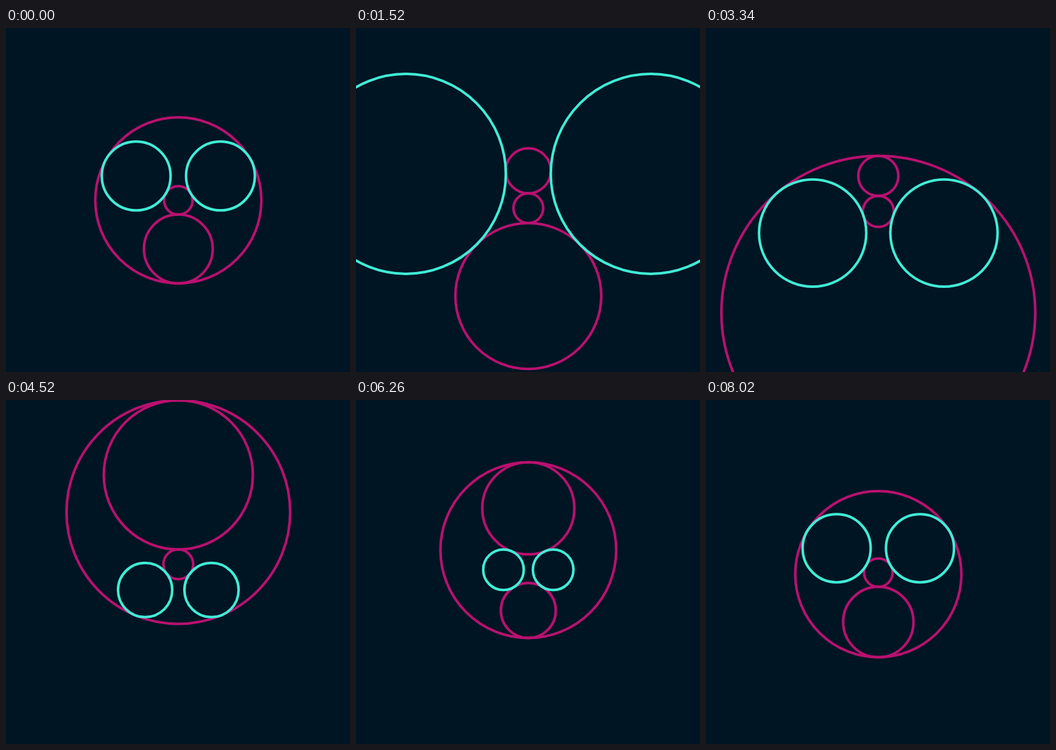
These frames come from a looping animation (540x540 px, 8.04 s). An HTML page with a canvas:

```html
<!DOCTYPE html>
<html lang="en">
<head>
<meta charset="utf-8">
<title>Rotating sphere of circles</title>
<style>
  html, body { margin: 0; width: 100%; height: 100%; overflow: hidden; background: #001524; }
  canvas { display: block; }
</style>
</head>
<body>
<canvas id="stage" width="540" height="540"></canvas>
<script>
const ctx = document.getElementById('stage').getContext('2d');
const LOOP = 8040, STEP = 20;
const CENTER = 270.5, SCALE = 54;
const MAGENTA = '#b9116f', CYAN = '#40edd6';

// Five equal caps on a unit sphere: two poles and three around the equator.
const CAP = Math.PI / 4;
const S = Math.sin(2 * Math.PI / 3);
const caps = [
  [0, 0, 1, MAGENTA],
  [0, 0, -1, MAGENTA],
  [0, 1, 0, MAGENTA],
  [-S, -0.5, 0, CYAN],
  [S, -0.5, 0, CYAN]
];

// Turn a cap about the x axis and draw its stereographic projection.
function drawCap([x, y, z, color], turn) {
  const c = Math.cos(turn), s = Math.sin(turn);
  const q = Math.cos(CAP) + y * s + z * c;
  const k = SCALE / q;
  ctx.strokeStyle = color;
  ctx.beginPath();
  ctx.arc(CENTER + x * k, CENTER + (y * c - z * s) * k,
          Math.abs(Math.sin(CAP) * k), 0, 2 * Math.PI);
  ctx.stroke();
}

function draw(time) {
  const t = Math.floor((time % LOOP) / STEP) * STEP;
  ctx.fillStyle = '#001524';
  ctx.fillRect(0, 0, 540, 540);
  ctx.lineWidth = 4;
  for (const cap of caps) drawCap(cap, 2 * Math.PI * t / LOOP);
}

function tick() {
  draw(performance.now());
  requestAnimationFrame(tick);
}
tick();
</script>
</body>
</html>
```
